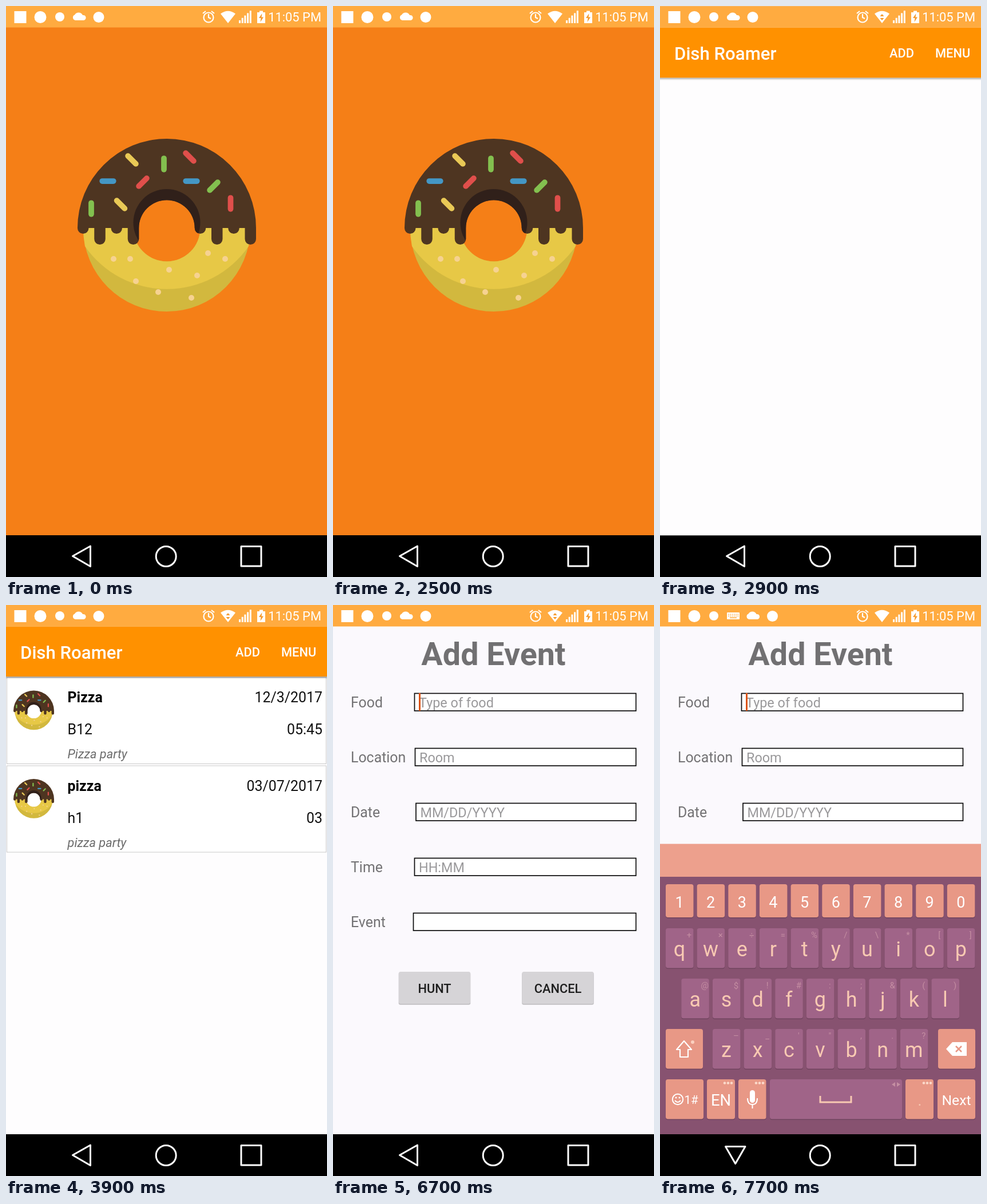
An HTML page that plays this animation: 561 px wide and 998 px high, repeating every 8 s.

```html
<!DOCTYPE html>
<html lang="en">
<head>
<meta charset="utf-8">
<title>Food events app</title>
<style>
  html, body { margin: 0; width: 100%; height: 100%; overflow: hidden; background: #000; }
  svg { display: block; width: 100vw; height: 100vh; font-family: Roboto, sans-serif; }
</style>
</head>
<body>
<svg id="stage" viewBox="0 0 561 998"></svg>
<script>
const LOOP = 8000, STEP = 200;
const PEACH = '#e89886', PURPLE = '#a06488', LETTER = '#f8c9b2';

const rect = (x, y, w, h, fill, extra = '') =>
  `<rect x="${x}" y="${y}" width="${w}" height="${h}" fill="${fill}" ${extra}/>`;
const circle = (x, y, r, fill, extra = '') =>
  `<circle cx="${x}" cy="${y}" r="${r}" fill="${fill}" ${extra}/>`;
const path = (d, fill, extra = '') => `<path d="${d}" fill="${fill}" ${extra}/>`;
const line = (d, color, width, extra = '') =>
  path(d, 'none', `stroke="${color}" stroke-width="${width}" ${extra}`);
const text = (x, y, size, str, fill, extra = '') =>
  `<text x="${x}" y="${y}" font-size="${size}" fill="${fill}" ${extra}>${str}</text>`;
const MIDDLE = 'text-anchor="middle"', END = 'text-anchor="end"';
const MEDIUM = 'font-weight="500"', BOLD = 'font-weight="700"';

// A window: background, status strip, content and navigation strip
const screen = (id, color, content) => `<g id="${id}">
  ${rect(0, 0, 561, 998, color)}${rect(0, 0, 561, 37.5, '#ffab40')}
  ${content}${rect(0, 925, 561, 160, '#000')}</g>`;

function donut() {
  const drip = (x, bottom) => `V${bottom - 9.75}a9.75 9.75 0 0 1 -19.5 0V388`;
  const drips = right => [417, 398, 417, 398].map((bottom, i) => {
    const x = right - i * 29.25;
    return `H${x}${drip(x, right > 300 ? bottom : bottom)}`;
  });
  const rightDrips = drips(437).join('');
  const leftDrips = drips(232.25).join('');
  const icing = `M125 388A156 156 0 0 1 437 388${rightDrips}H329.75` +
    `A48.75 48.75 0 0 0 232.25 388${leftDrips}Z`;
  const sprinkles = [
    [220, 269, 45, '#e9c956'], [276, 276, 90, '#83c04f'], [321, 264, 45, '#e04f4b'],
    [178, 306, 0, '#4497c5'], [239, 308, -45, '#e04f4b'], [324, 306, 0, '#4497c5'],
    [363, 315, -45, '#83c04f'], [392.5, 345, 90, '#e04f4b'], [149, 354, 90, '#83c04f'],
    [200.5, 347, 45, '#e9c956']
  ].map(([x, y, angle, color]) => line('M-9.75 0H9.75', color, 9.75,
    `stroke-linecap="round" transform="translate(${x} ${y}) rotate(${angle})"`));
  const sugar = [[188, 442], [217, 442], [353, 432], [383, 442], [285, 461],
    [334, 471], [227, 481], [266, 500], [324, 510]]
    .map(([x, y]) => circle(x, y, 5, '#f6d291'));
  const hole = 'H339.5A58.5 58.5 0 0 1 222.5 388Z';
  return `<clipPath id="icing">${path(icing, '#000')}</clipPath><g id="donut">
    ${path('M135 388A146 146 0 0 0 427 388' + hole, '#d2b83e')}
    ${path('M135 388Q135 404 138 420A174 174 0 0 0 424 420Q427 404 427 388' + hole, '#e7c846')}
    ${path(icing, '#4e3521')}
    ${circle(281, 378.5, 58.5, '#30201a', 'clip-path="url(#icing)"')}
    ${sprinkles.join('')}${sugar.join('')}</g>`;
}

function listScreen() {
  const row = (top, food, date, room, time, note) => `<g transform="translate(0 ${top})">
    ${rect(1.5, .5, 558, 151, '#fff', 'stroke="#c9c9c9"')}
    <use href="#donut" transform="translate(13 23.5) scale(.2276) translate(-125 -232)"/>
    ${text(107.5, 44, 24.9, food, '#000', BOLD)}${text(553, 44, 24.9, date, '#111', END)}
    ${text(107.5, 100, 24.9, room, '#111')}${text(553, 100, 24.9, time, '#111', END)}
    ${text(107.5, 142, 21.8, note, '#6c6c6c', 'font-style="italic"')}</g>`;
  return screen('list', '#fefdfe', `
    <g id="rows">${row(126, 'Pizza', '12/3/2017', 'B12', '05:45', 'Pizza party')}
    ${row(280.5, 'pizza', '03/07/2017', 'h1', '03', 'pizza party')}</g>
    ${rect(0, 125, 561, 2, '#000', 'opacity=".28"')}${rect(0, 127, 561, 2, '#000', 'opacity=".1"')}
    ${rect(0, 37.5, 561, 87.5, '#ff9100')}
    ${text(25, 93.5, 31.2, 'Dish Roamer', '#fff', MEDIUM)}
    ${text(401, 90, 21.8, 'ADD', '#fff', MEDIUM)}${text(481, 90, 21.8, 'MENU', '#fff', MEDIUM)}`);
}

function formScreen() {
  const fields = [['Food', 142, 'Type of food'], ['Location', 143, 'Room'],
    ['Date', 144.5, 'MM/DD/YYYY'], ['Time', 142, 'HH:MM'], ['Event', 140, '']]
    .map(([label, x, hint], i) => {
      const y = 154 + i * 96;
      return text(31, y + 25, 24.9, label, '#737274') +
        rect(x + .5, y + .5, 529 - x, 30.5, '#fff', 'stroke="#0a0a0a" stroke-width="1.7"') +
        text(x + 8, y + 25, 23.4, hint, '#9a999b');
    });
  const button = (x, label) => rect(x, 643, 125, 56, '#000', 'rx="3" opacity=".1"') +
    rect(x - .5, 642, 126, 56.5, '#000', 'rx="3" opacity=".15"') +
    rect(x, 641, 125, 56, '#d6d4d7', 'rx="3"') +
    text(x + 62.5, 677.5, 21.8, label, '#1e1e1e', MIDDLE + MEDIUM);
  return screen('form', '#fbf9fd', `
    ${text(280.5, 105, 55.6, 'Add Event', '#717072', MIDDLE + ' ' + BOLD)}
    ${fields.join('')}${rect(150, 154, 3, 31, '#dc5416', 'id="cursor"')}
    ${button(115, 'HUNT')}${button(330.5, 'CANCEL')}${keyboard()}`);
}

function keyboard() {
  const PITCH = 54.65;
  const key = (x, y, w, h, fill) =>
    rect(x, y + 1.5, w, h, '#70445e', 'rx="4"') + rect(x, y, w, h, fill, 'rx="4"');
  const numbers = [...'1234567890'].map((digit, i) => key(10 + i * PITCH, 488, 48.5, 58, PEACH) +
    text(34 + i * PITCH, 529, 27, digit, '#fff', MIDDLE));
  const letters = (x0, y, chars, hints) => [...chars].map((char, i) => {
    const x = x0 + i * PITCH;
    return key(x, y, 48.5, 69.5, PURPLE) + text(x + 24, y + 49, 36, char, LETTER, MIDDLE) +
      text(x + 41, y + 17, 15, hints[i].replace('&', '&amp;'), '#c48ea2', MIDDLE);
  }).join('');
  const special = (x, w, y = 829, fill = PEACH) => key(x, y, w, 69.5, fill);
  const dots = x => [-6, 0, 6].map(d => circle(x + d, 835.5, 2.3, '#fbd9ca')).join('');
  const white = (d, width = 2) => line(d, '#fff', width, 'stroke-linejoin="round"');
  return `<g id="keyboard">
    ${rect(0, 418, 561, 620, '#875270')}${rect(0, 417.5, 561, 57.5, '#eda08d')}
    ${numbers.join('')}
    ${letters(10, 565, 'qwertyuiop', '+×÷=%/\\*[]')}
    ${letters(37.3, 653, 'asdfghjkl', '@$!#:;&()')}
    ${letters(92, 741, 'zxcvbnm', '–_\'",.?')}
    ${special(10, 65, 741)}${white('M42 762L55 777H49V790H35V777H29Z', 2.2)}${circle(57, 764, 3, '#fbd0bf')}
    ${special(486, 65, 741)}${path('M500 776L511 764H536V788H511Z', '#fff')}
    ${line('M517 771L527 781M527 771L517 781', PEACH, 2.5)}
    ${special(10, 66)}${circle(31, 864, 9.2, 'none', 'stroke="#fff" stroke-width="2"')}
    ${circle(28, 861, 1.5, '#fff')}${circle(34, 861, 1.5, '#fff')}${white('M26 866Q31 872 36 866')}
    ${text(42.5, 871.5, 20.5, '1#', '#fff')}
    ${special(82, 49)}${text(106.5, 875, 27.5, 'EN', '#fff', MIDDLE)}${dots(119)}
    ${special(137, 48.5)}${rect(157, 848, 9, 22, '#fff', 'rx="4.5"')}
    ${white('M153 862Q153 873 161.500 873Q170 873 170 862M161.500 873V880')}${dots(174)}
    ${special(192, 231, 829, PURPLE)}${line('M280 858V869H334V858', LETTER, 3)}
    ${path('M411 834V842L405 838ZM414 834V842L420 838Z', '#c48ea2')}
    ${special(429, 49)}${text(454, 875, 26, '.', LETTER, MIDDLE)}${dots(467)}
    ${special(485, 66)}${text(518, 874, 24.7, 'Next', '#fff', MIDDLE)}</g>`;
}

function systemIcons() {
  const bars = [0, 1, 2, 3, 4].map(i =>
    rect(407 + i * 4.7, 25 - i * 4.2, 3, 5 + i * 4.2, '#fff'));
  const typing = [0, 1].map(r => [0, 1, 2, 3, 4, 5].map(i =>
    rect(119 + i * 3.3, 15.500 + r * 3, 1.6, 1.6, '#ffab40')).join('')).join('');
  const outline = 'fill="none" stroke="#fff" stroke-width="3" stroke-linejoin="round"';
  return `${rect(14.5, 9, 21, 21, '#fff')}${circle(60, 19.5, 10.5, '#fff')}${circle(94, 19, 8, '#fff')}
    <g id="typing">${rect(117, 13, 22, 12, '#fff', 'rx="1"')}${typing}${rect(122, 21.5, 12, 1.6, '#ffab40')}</g>
    <g id="notices">${path('M121 25A5 5 0 0 1 120 15.500A8 8 0 0 1 134 16A4.600 4.600 0 0 1 136 25Z', '#fff')}
    ${circle(162, 19.5, 9.5, '#fff')}</g>
    ${line('M354 14V20L358 22M344 13L349 9M364 13L359 9', '#fff', 2.2)}
    ${circle(354, 20, 8.5, 'none', 'stroke="#fff" stroke-width="2.2"')}
    ${path('M375 13.500Q388 4 401 13.500L388 30Z', '#fff')}
    ${path('M384.500 18L388 14L391.500 18ZM384.500 21L388 25L391.500 21Z', '#f59a2c', 'id="traffic"')}
    ${bars.join('')}
    ${path('M439 11H443V8.500H449V11H453V30H439Z', '#fff')}
    ${path('M447.500 13L442 21H445.500L444.500 28L450 19.500H446.500Z', '#f59a2c')}
    ${text(551, 27, 21.9, '11:05 PM', '#fff', END)}
    <g ${outline}><path id="back"/><circle cx="279.700" cy="962" r="17.500"/>
    <rect x="411" y="944.500" width="35" height="34.500"/></g>`;
}

const stage = document.getElementById('stage');
stage.innerHTML = `<defs>${donut()}</defs>` +
  screen('splash', '#f57f17', '<use href="#donut"/>') +
  listScreen() + formScreen() + systemIcons();
const el = id => document.getElementById(id);
const show = (id, on) => el(id).setAttribute('visibility', on ? 'inherit' : 'hidden');
const progress = (time, start, duration) => Math.min(1, Math.max(0, (time - start) / duration));
const easeOut = (p, power) => 1 - (1 - p) ** power;

// The new window rises and fades in while the one below darkens
function openWindow(id, below, time, start) {
  const rise = 80 * (1 - easeOut(progress(time, start, 350), 5));
  el(id).setAttribute('transform', `translate(0 ${rise.toFixed(2)})`);
  el(id).setAttribute('opacity', easeOut(progress(time, start, 200), 4));
  el(below).setAttribute('opacity', (el(below).getAttribute('opacity') ?? 1) *
    (1 - .3 * progress(time, start, 217)));
}

function draw(time) {
  el('splash').setAttribute('opacity', 1);
  openWindow('list', 'splash', time, 2666);
  openWindow('form', 'list', time, 5565);
  show('splash', time < 3000);
  show('rows', time >= 3700);
  show('cursor', (time + 450) % 1000 < 500);

  const typing = time >= 6900;
  const lift = progress(time, 6800, 250);
  el('keyboard').setAttribute('opacity', easeOut(lift, 4));
  el('keyboard').setAttribute('transform', `translate(0 ${50 * (1 - easeOut(lift, 5))})`);
  show('typing', typing);
  el('notices').setAttribute('transform', `translate(${typing ? 34.5 : 0} 0)`);
  el('back').setAttribute('d', typing ? 'M114.500 946.500H149L131.750 976.500Z' : 'M116.500 961.500L147.500 944V979.500Z');
  show('traffic', time >= 2700 && time < 5700 || time >= 6500 && time < 6900);
}

// The screen refreshes five times a second
const start = performance.now();
function tick() {
  const time = (performance.now() - start) % LOOP;
  draw(Math.max(0, Math.floor((time - 100) / STEP) * STEP + 100));
  requestAnimationFrame(tick);
}
tick();
</script>
</body>
</html>
```
